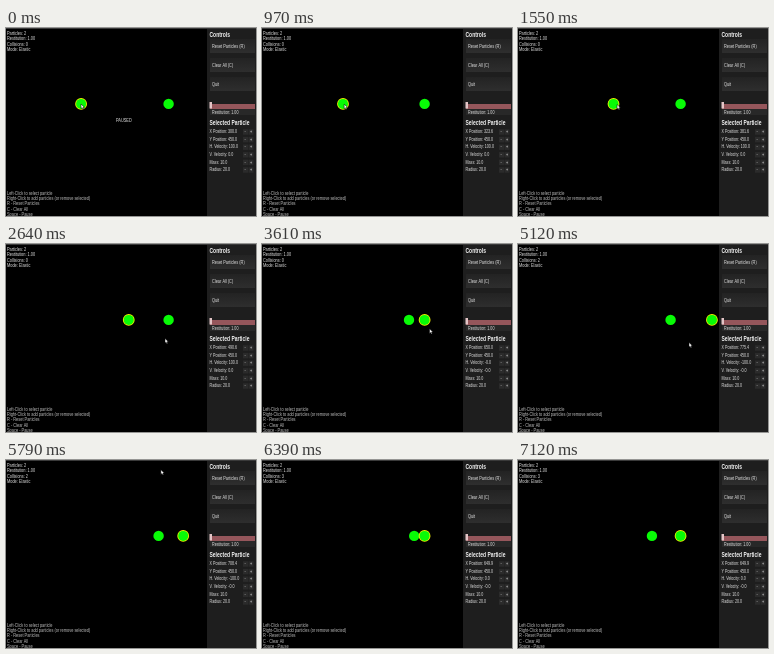
These frames come from a looping animation (250 by 188 pixels, 7150 ms). An HTML page with a canvas:

```html
<!DOCTYPE html>
<html lang="en">
<head>
<meta charset="utf-8">
<title>Elastic particles</title>
<style>
html, body { margin: 0; width: 100%; height: 100%; overflow: hidden; background: #000; }
canvas { display: block; }
</style>
</head>
<body>
<canvas id="stage" width="250" height="188"></canvas>
<script>
const ctx = document.getElementById('stage').getContext('2d');
const LOOP = 7150, START = 735, PICK = 3250;
const SPEED = 0.1;   // world units per ms
const SCALE = 0.25;  // pixels per world unit
const FROM = 300, HIT = 610, REST = 650, WALL = 780;
const OVERLAP = 6;   // how far the first contact pushes the pair apart
const NARROW = 0.78; // condensed face for all labels
const arrow = new Path2D('M0 0V4.6L1.1 3.7 1.9 5.2 2.7 4.8 2 3.3 3.4 3.2Z');

// key points of the pointer: time, x, y
const pointer = [[0, 75, 76], [760, 76, 76], [1550, 99, 76.5], [2640, 159, 94.5],
  [PICK, 166, 79], [4450, 171, 98.5], [5180, 171, 98.5], [5900, 152, -6]];

function pointerAt(t) {
  const i = pointer.findIndex(key => key[0] > t);
  if (i < 0) return [0, -10];
  const [t0, x0, y0] = pointer[i - 1], [t1, x1, y1] = pointer[i];
  const p = (t - t0) / (t1 - t0);
  return [x0 + (x1 - x0) * p, y0 + (y1 - y0) * p];
}

// The motion passes from left to right particle, off the wall and back again.
function stateAt(t) {
  let d = SPEED * Math.max(0, t - START);
  if (d >= HIT - FROM - OVERLAP) d += OVERLAP;
  const afterHit = d - (HIT - FROM);
  const afterWall = afterHit - (WALL - REST);
  const afterBack = afterWall - (WALL - REST);
  if (afterBack >= 0) return { left: HIT - afterBack, right: REST - 0.1, vel: '0.0', hits: 3 };
  if (afterWall >= 0) return { left: HIT, right: WALL - afterWall, vel: '-100.0', hits: 2 };
  if (afterHit >= 0) return { left: HIT, right: REST + afterHit, vel: '100.0', hits: 1 };
  return { left: FROM + d, right: REST, vel: '-0.0', hits: 0 };
}

function label(str, x, y, size = 5, color = '#e4e4e4', weight = '') {
  ctx.save();
  ctx.translate(x, y);
  ctx.scale(NARROW, 1);
  ctx.font = `${weight} ${size}px "Liberation Sans", Arial, sans-serif`;
  ctx.textBaseline = 'middle';
  ctx.fillStyle = color;
  ctx.fillText(str, 0, 0);
  ctx.restore();
}

const title = (str, y) => label(str, 203.5, y, 6.4, '#f2f2f2', 'bold');

const lines = (list, y, step, color) =>
  list.forEach((line, i) => label(line, 1, y + step * i, 5, color));

function box(x, y, w, h, color) {
  ctx.fillStyle = color;
  ctx.fillRect(x, y, w, h);
}

function disc(x, r, color) {
  ctx.beginPath();
  ctx.arc(x * SCALE + 0.1, 75.9, r, 0, 2 * Math.PI);
  ctx.fillStyle = color;
  ctx.fill();
}

function particle(x, selected) {
  if (selected) disc(x, 5.9, '#f4f000');
  disc(x, selected ? 5 : 5.2, '#08fb06');
}

function button(name, y) {
  const shade = ctx.createLinearGradient(0, y, 0, y + 14);
  shade.addColorStop(0, '#232323');
  shade.addColorStop(1, '#2e2e2e');
  box(204, y, 45, 14, shade);
  label(name, 206, y + 7.2);
}

function panel(x, vx, vy) {
  box(201, 0, 49, 188, '#1e1e1e');
  title('Controls', 7);
  ['Reset Particles (R)', 'Clear All (C)', 'Quit'].forEach((name, i) => button(name, 11 + 19 * i));
  box(204, 76, 45, 5, '#95565b');
  box(203.5, 74, 2.5, 6.5, '#e3c5c7');
  box(204, 81, 45, 6, '#282828');
  label('Restitution: 1.00', 206, 84.3, 4.7);
  title('Selected Particle', 95.2);
  const rows = ['X Position: ' + x.toFixed(1), 'Y Position: 450.0', 'H. Velocity: ' + vx,
    'V. Velocity: ' + vy, 'Mass: 10.0', 'Radius: 20.0'];
  rows.forEach((row, i) => {
    const y = 104 + 7.6 * i;
    label(row, 203.5, y, 4.7);
    ['-', '+'].forEach((sign, j) => {
      box(237 + 5.5 * j, y - 2.7, 5, 5.4, '#2b2b2b');
      label(sign, 238.5 + 5.5 * j, y, 4.7);
    });
  });
}

function draw(t) {
  const s = stateAt(t);
  const rightPicked = t >= PICK;
  box(0, 0, 250, 188, '#000');
  lines(['Particles: 2', 'Restitution: 1.00', 'Collisions: ' + s.hits, 'Mode: Elastic'], 5.5, 5.5);
  lines(['Left-Click to select particle', 'Right-Click to add particles (or remove selected)',
    'R - Reset Particles', 'C - Clear All', 'Space - Pause'], 165.2, 5.4, '#c0c0c0');
  if (t < START + 25) label('PAUSED', 110, 92.5);
  particle(s.left, !rightPicked);
  particle(s.right, rightPicked);
  if (rightPicked) panel(s.right, s.vel, '-0.0');
  else panel(s.left, '100.0', '0.0');
  box(0, 0, 250, 1, '#3a3a3a');

  ctx.save();
  ctx.translate(...pointerAt(t));
  ctx.lineWidth = 0.5;
  ctx.strokeStyle = '#000';
  ctx.fillStyle = '#fff';
  ctx.fill(arrow);
  ctx.stroke(arrow);
  ctx.restore();
}

const begin = performance.now();
function tick() {
  draw((performance.now() - begin) % LOOP);
  requestAnimationFrame(tick);
}
tick();
</script>
</body>
</html>
```
